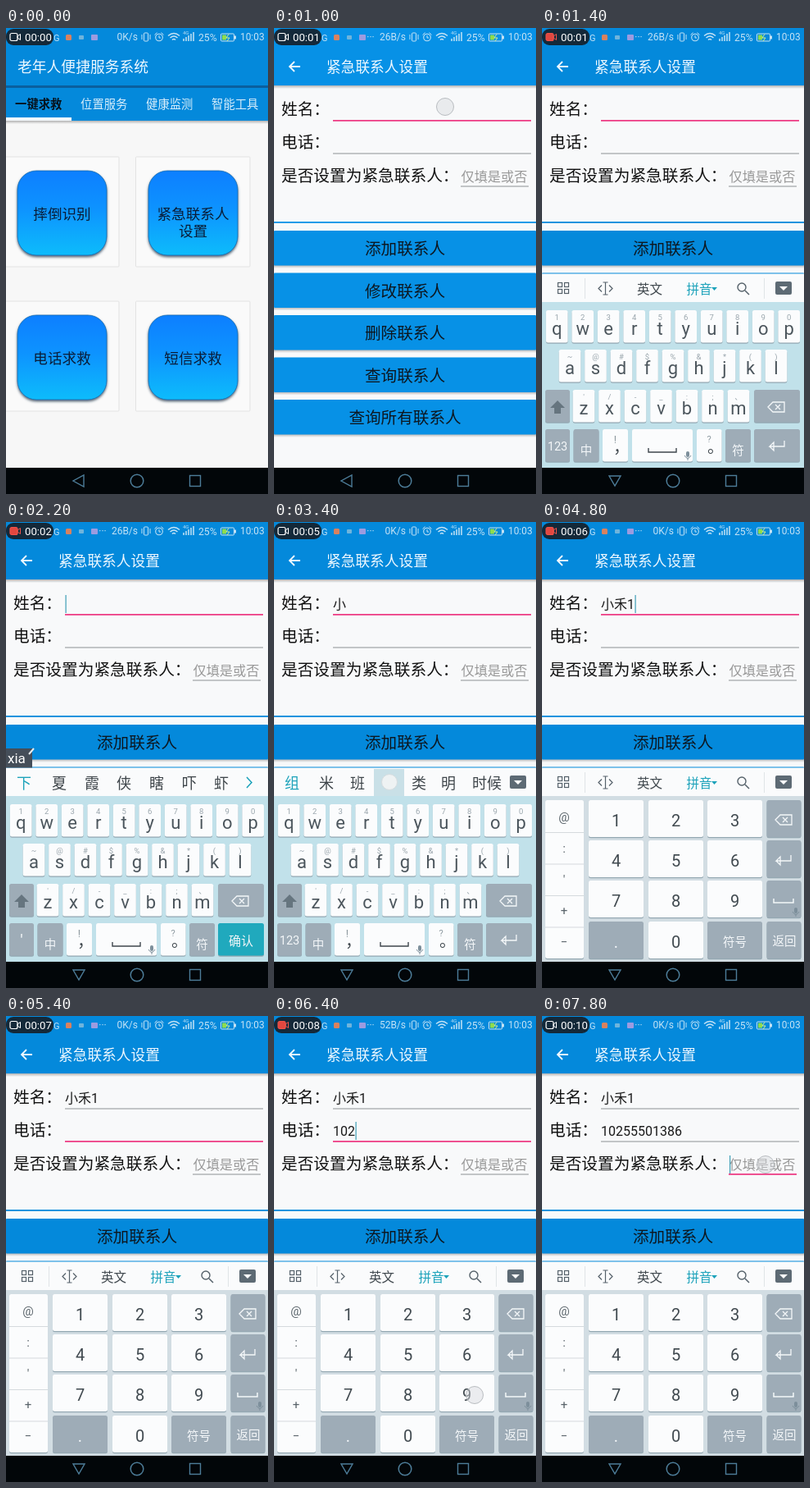
Recreate the animation shown at these times as an HTML page. Size 320 by 568 pixels, loop 8 s.

```html
<!DOCTYPE html>
<html lang="zh-CN">
<head>
<meta charset="utf-8">
<title>紧急联系人设置</title>
<style>
html, body { margin: 0; width: 100%; height: 100%; overflow: hidden; background: #000; }
svg { display: block; width: 320px; height: 568px; font-family: Roboto, "Noto Sans CJK SC", "Noto Sans CJK", sans-serif; }
</style>
</head>
<body>
<svg id="stage" viewBox="0 0 320 568" xmlns="http://www.w3.org/2000/svg"></svg>
<script>
const LOOP = 8000, STEP = 200;
const NAME = '小禾', PHONE = '10255501386';
const BLUE = '#0489db', PINK = '#ee3f86', TEAL = '#1ba2ba', GREY = '#9eacb7';
const stage = document.getElementById('stage');

const DEFS = `<defs>
<linearGradient id="tile" x2="0" y2="1"><stop stop-color="#087fff"/><stop offset=".45" stop-color="#0793ff"/><stop offset="1" stop-color="#0bbcfb"/></linearGradient>
<linearGradient id="fade" x2="0" y2="1"><stop stop-color="#000" stop-opacity=".28"/><stop offset="1" stop-color="#000" stop-opacity="0"/></linearGradient>
<filter id="soft" x="-20%" y="-20%" width="140%" height="150%"><feDropShadow dx="0" dy="2" stdDeviation="1.4" flood-color="#20384c" flood-opacity=".75"/></filter>
</defs>`;

const rect = (x, y, w, h, fill, rx = 0, more = '') =>
  `<rect x="${x}" y="${y}" width="${w}" height="${h}" fill="${fill}" rx="${rx}" ${more}/>`;
const path = (d, stroke, w = 1.2, fill = 'none') =>
  `<path d="${d}" stroke="${stroke}" stroke-width="${w}" fill="${fill}"/>`;
const ring = (x, y, r, stroke, w = 1.2, fill = 'none') =>
  `<circle cx="${x}" cy="${y}" r="${r}" stroke="${stroke}" stroke-width="${w}" fill="${fill}"/>`;
// y is the optical middle of the line
const text = (s, x, y, size, fill, anchor = 'start', more = '') =>
  `<text x="${x}" y="${(y + size * .37).toFixed(1)}" font-size="${size}" fill="${fill}" text-anchor="${anchor}" ${more}>${s}</text>`;
const mid = (s, x, y, size, fill, more) => text(s, x, y, size, fill, 'middle', more);
const touch = (x, y) => ring(x, y, 10.5, '#b9bdc1', 1, 'rgba(215,218,221,.45)');

// Last value whose start time has been reached: pick(t, start, value, start, value, ...)
function pick(t, ...pairs) {
  let v = pairs[1];
  for (let i = 0; i < pairs.length; i += 2) if (t >= pairs[i]) v = pairs[i + 1];
  return v;
}

function statusBar(t) {
  const ink = '#c4e2f5';
  const sec = pick(t, 0, 0, 800, 1, 1600, 2, 2400, 3, 2800, 4, 3200, 5, 4400, 6, 5200, 7, 6000, 8, 6800, 9, 7600, 10);
  const speed = pick(t, 0, '0K/s', 800, '26B/s', 2800, '0K/s', 5600, '52B/s', 7200, '0K/s');
  const phase = t % 866, red = phase > 300 && phase < 700;
  const rec = red ? '#f0524a' : '#fff';
  return text('G', 58, 11.5, 11, ink)
    + rect(73, 8, 7, 7, '#d9825f', 1.5) + rect(89, 9, 6, 5, '#6fb4dc', 1) + rect(104, 8, 8, 7, '#9c9be0', 1)
    + (t < 600 ? '' : text('···', 118, 11, 12, ink, 'middle'))
    + rect(0, 1, 58, 20, '#16222e', 9, 'opacity=".93"')
    + rect(5, 6.5, 9, 9, red ? '#e2473f' : 'none', 2, `stroke="${rec}" stroke-width="1.2"`)
    + path('M14 10l3.5-2.5v7L14 12z', rec, 1)
    + text('00:' + String(sec).padStart(2, '0'), 23, 11.5, 13.2, '#fff')
    + text(speed, 161, 11, 12, ink, 'end')
    + rect(168.5, 6, 5, 10, 'none', 1, `stroke="${ink}"`) + path('M166 8v6M176 8v6', ink, 1)
    + ring(187, 11.5, 4.3, ink, 1.1) + path('M187 9v3h2M181.5 8.5l3-3M192.5 8.5l-3-3', ink, 1)
    + path('M198 9.5q7-6 14 0M200.5 12q4.5-4 9 0M203 14.5q2-2 4 0', ink, 1.5)
    + text('4G', 216, 6, 6, ink)
    + path('M217 16v-3M220 16v-5M223 16v-7M226 16V7M229 16V5', ink, 1.5)
    + text('25%', 235, 11, 12.2, ink)
    + rect(262.5, 7, 16, 9, 'none', 1, `stroke="${ink}"`) + rect(264, 8.5, 5, 6, '#8edc4c') + rect(279, 9.5, 2, 4, ink)
    + path('M272 7.5l-3 4.5h4l-3 4', '#d5f28a', 1)
    + text('10:03', 286, 11, 11.9, ink);
}

function navBar(down) {
  const c = '#4d7d99';
  return rect(0, 536, 320, 32, '#020609')
    + path(down ? 'M82 546h14l-7 12z' : 'M95 545v14l-13-7z', c, 1.4)
    + ring(160, 552, 7.8, c, 1.5) + rect(224.5, 545.5, 13, 13, 'none', 0, `stroke="${c}" stroke-width="1.4"`);
}

function home() {
  const tile = (x, y, lines) => {
    const cardX = x < 100 ? -4 : 158.5, w = x < 100 ? 142 : 139.5;
    return rect(cardX, y - 17, w, 134, '#fafafa', 1, 'stroke="#e3e3e3"')
      + rect(x, y, 109, 103, 'url(#tile)', 23, 'filter="url(#soft)" stroke="#1769ad" stroke-width=".8"')
      + lines.map((s, i) => mid(s, x + 54.5, y + 52 + i * 21.5, 17.6, '#0a1d38', 'font-weight="500"')).join('');
  };
  const tabs = ['一键求救', '位置服务', '健康监测', '智能工具'];
  return rect(0, 0, 320, 568, '#f7f7f7')
    + rect(0, 0, 320, 113, BLUE) + rect(0, 70, 320, 3, '#0a5f9e')
    + rect(0, 113, 320, 4, 'url(#fade)')
    + text('老年人便捷服务系统', 14, 47, 17.8, '#eef8ff')
    + tabs.map((s, i) => mid(s, 39.7 + i * 80, 93, 14.3, i ? '#d9eefb' : '#06121c', i ? '' : 'font-weight="700"')).join('')
    + rect(0, 109, 80, 4, '#f4f9fc')
    + tile(14, 174, ['摔倒识别']) + tile(174, 174, ['紧急联系人', '设置'])
    + tile(14, 350, ['电话求救']) + tile(174, 350, ['短信求救']);
}

function form(t) {
  const focus = pick(t, 0, 0, 5200, 1, 7800, 2);
  const name = t < 2800 ? '' : t < 3600 ? '小' : t < 4600 ? NAME : NAME + '1';
  const typed = t < 5600 ? 0 : t < 6400 ? 1 + Math.floor((t - 5600) / 400) : 3 + Math.round((t - 6400) / 125);
  const phone = PHONE.slice(0, typed);
  const bar = t < 1200 ? '#0791e6' : BLUE;
  const line = (i, x1, x2, y) => rect(x1, y - (focus === i ? 1 : .5), x2 - x1, focus === i ? 1.8 : 1, focus === i ? PINK : '#8d9296');
  const solid = t >= 5600 && t < 7600;
  const blink = t >= 1200 && (solid || t % 1000 < 400 || t % 1000 >= 700);
  const caretX = [72.5 + name.length * 16 - (t >= 4600 ? 7 : 0), 72.5 + phone.length * 9, 229][focus];
  const caretY = [89, 129, 170][focus];
  const labels = ['添加联系人', '修改联系人', '删除联系人', '查询联系人', '查询所有联系人'];
  return rect(0, 0, 320, 568, '#f8f9fa')
    + rect(0, 0, 320, 70, bar) + rect(0, 70, 320, 4, 'url(#fade)')
    + path('M32 47H19.5M25 41l-6 6 6 6', '#eef8ff', 1.8)
    + text('紧急联系人设置', 64, 47, 17.7, '#eef8ff')
    + text('姓名：', 9, 99, 19.7, '#111') + text('电话：', 9, 139, 19.7, '#111')
    + text('是否设置为紧急联系人：', 9, 180, 19.7, '#111')
    + line(0, 72, 314, 113) + line(1, 72, 314, 153) + line(2, 228, 311, 193)
    + text(name, 72, 100, 16, '#191919') + text(phone, 72, 140, 16, '#191919')
    + text('仅填是或否', 228.5, 181, 16.2, '#999')
    + (blink ? rect(caretX, caretY, 1.2, 22, '#3f9fb6') : '')
    + rect(0, 236, 320, 1.8, bar)
    + labels.map((s, i) => {
      const y = 247 + i * 51.5;
      return rect(0, y + 42, 320, 4, 'url(#fade)') + rect(0, y, 320, 42.5, bar, 1) + mid(s, 160, y + 22, 19.6, '#0d1720');
    }).join('');
}

const key = (x, y, w, h, fill = '#fbfcfd') =>
  rect(x, y + 1.2, w, h, '#94a8b2', 2.5) + rect(x, y, w, h, fill, 2.5);

const collapse = x => rect(x - 10, 309, 20, 16, '#5d6a74', 2) + path(`M${x - 5} 315h10l-5 5z`, 'none', 0, '#fff');
const erase = (x, y) => path(`M${x - 10} ${y}l6-6h14v12h-14zM${x - 1} ${y - 3}l6 6m0-6l-6 6`, '#f4f7f9', 1.3);
const enter = (x, y) => path(`M${x + 9} ${y - 7}v7h-18l5-5v10l-5-5`, '#f4f7f9', 1.3);
const mic = (x, y) => rect(x - 2, y - 5, 4, 7, '#7d8f9b', 2) + path(`M${x - 4} ${y}q4 7 8 0M${x} ${y + 3}v3`, '#7d8f9b', 1);

function toolbar() {
  const c = '#55616a', boxes = [[20, 311], [28, 311], [20, 319], [28, 319]];
  return boxes.map(([x, y]) => rect(x - .5, y - .5, 5, 5, 'none', 0, `stroke="${c}" stroke-width="1.2"`)).join('')
    + path('M77.5 310v15M74.5 310h6M74.5 325h6M73 313.5l-4 4 4 4M82 313.5l4 4-4 4', c, 1.2)
    + mid('英文', 131.5, 318, 15.5, '#3f474d') + mid('拼音', 192, 318, 15.5, TEAL)
    + path('M207 316h7l-3.5 4z', 'none', 0, TEAL)
    + ring(244, 316, 5, c, 1.4) + path('M248 320l5 5', c, 1.5)
    + path('M52.5 305v25M271.5 305v25', '#e0e4e7', 1) + collapse(295);
}

function candidates(t) {
  const typing = t >= 1600 && t < 2800;
  const xs = typing ? [22, 65, 105, 144, 184, 224, 263] : [22, 64, 102, 141, 177, 213, 260];
  const words = t < 1800 ? '想 下 小 新 学 向 些' : t < 2000 ? '系 西 洗 喜 细 戏 席'
    : t < 2400 ? '下 夏 霞 侠 瞎 吓 虾' : t < 2800 ? '小 笑 校 效 消 晓 销'
    : t < 3600 ? `组 米 班 ${t < 3400 ? NAME[1] : ''} 类 明 时候` : '的 和 在 是 说 了 我们';
  return words.split(' ').map((s, i) => mid(s, xs[i], 318, 18, i ? '#3e454a' : TEAL)).join('')
    + (typing ? path('M294 311l6 6.5-6 6.5', TEAL, 1.5) : collapse(298))
    + (t === 3400 ? rect(122, 301, 37, 33, '#c9e0e7') + ring(141, 317, 9.5, '#d5dcdf', 1, '#eef2f3') : '');
}

function letters(t) {
  const typing = t >= 1600 && t < 2800;
  const rows = [
    ['qwertyuiop', '1234567890', 18.2, 344],
    ['asdfghjkl', '~@#$%&*()', 34, 392],
    ['zxcvbnm', "'/-_:;、", 51, 441]
  ];
  const cap = (c, sup, x, y) => key(x - 13.3, y, 26.6, 39.5)
    + mid(sup.replace('&', '&amp;'), x, y + 8, 9.5, '#9aa6ad') + mid(c, x, y + 22, 22, '#4c565d');
  const side = typing ? "'" : '123';
  return rect(0, 334, 320, 202, '#c1e1ea')
    + rows.map(([keys, sups, x, y]) => [...keys].map((c, i) => cap(c, sups[i], x + i * 31.5, y)).join('')).join('')
    + key(4, 441, 30, 39.5, GREY) + path('M19 454l9 9h-5v7h-8v-7h-5z', 'none', 0, '#66757f')
    + key(259, 441, 56, 39.5, GREY) + erase(286, 462)
    + key(4, 489, 30, 39.5, GREY) + mid(side, 19, 510, typing ? 20 : 14.5, '#f4f7f9')
    + key(38.5, 489, 31, 39.5, GREY) + mid('中', 54, 515, 14.5, '#f4f7f9')
    + key(74, 489, 31, 39.5) + mid('!', 89.5, 501, 13, '#8d999f') + text('，', 87, 511, 20, '#3f474d')
    + key(110, 489, 74, 39.5) + path('M130 512v5h34v-5', '#3f474d', 1.4) + mic(178, 521)
    + key(189, 489, 30.5, 39.5) + mid('?', 204, 501, 11, '#8d999f') + text('。', 202, 511, 20, '#3f474d')
    + key(224, 489, 31, 39.5, GREY) + mid('符', 239.5, 515, 14.5, '#f4f7f9')
    + key(259, 489, 56, 39.5, typing ? '#20a9bd' : GREY)
    + (typing ? mid('确认', 287, 510, 15, '#f4f7f9') : enter(287, 510));
}

const padX = [57, 130, 202], padY = [339, 388, 437, 487];

function numbers() {
  const pad = (i, fill) => key(padX[i % 3], padY[Math.floor(i / 3)], 67, 45, fill);
  const at = i => [padX[i % 3] + 33.5, padY[Math.floor(i / 3)] + 25];
  let s = rect(0, 334, 320, 202, '#d2dde3') + key(4, 339, 47, 193);
  ['@', ':', "'", '+', '−'].forEach((c, i) => {
    s += mid(c, 27, 359 + i * 38.2, 15, '#59636a');
    if (i) s += rect(4, 339.5 + i * 38.5, 47, 1, '#d5dadd');
  });
  for (let i = 0; i < 12; i++) {
    const label = i === 9 ? '.' : i === 10 ? '0' : i === 11 ? '符号' : i + 1;
    const dark = i === 9 || i === 11;
    s += pad(i, dark ? GREY : undefined) + mid(label, ...at(i), i === 11 ? 14.5 : 20, dark ? '#f4f7f9' : '#414a50');
  }
  padY.forEach(y => s += key(274.5, y, 42, 45, GREY));
  return s + erase(295, 363) + enter(295, 413)
    + path('M283 459v5h24v-5', '#f4f7f9', 1.5) + mic(310, 475)
    + mid('返回', 296, 511, 14.5, '#f4f7f9');
}

function keyboard(t) {
  const pinyin = pick(t, 0, '', 1600, 'x', 1800, 'xi', 2000, 'xia', 2400, 'xiao', 2800, '');
  const w = 5 + pinyin.length * 9;
  return rect(0, 299.5, 320, 35, '#fafbfc')
    + (t >= 4200 ? numbers() : letters(t))
    + (t < 1600 || t >= 4200 ? toolbar() : candidates(t))
    + (pinyin ? rect(0, 276, w, 23.5, '#454e59') + text(pinyin, 2, 288, 17, '#fff')
      + path(`M${w - 4} 283l6-7`, '#e8eef2', 2) : '');
}

function touches(t) {
  const digit = d => {
    const i = d === '0' ? 10 : d - 1;
    return touch(padX[i % 3] + 43, padY[Math.floor(i / 3)] + 24);
  };
  if (t === 400) return touch(232, 232);
  if (t === 1000) return touch(209, 96);
  if (t === 2600) return touch(22, 317);
  if (t === 4000) return touch(19, 510);
  if (t === 4600) return digit('1');
  if (t === 5200) return touch(209, 138);
  if (t === 5600 || t === 6000) return digit(PHONE[(t - 5600) / 400]);
  if (t === 6400) return touch(245, 462);
  if (t > 6400 && t <= 7400) return digit(PHONE[Math.min(10, 2 + Math.round((t - 6400) / 125))]);
  if (t === 7800) return touch(273, 181);
  return '';
}

function render(t) {
  const typing = t >= 1200;
  stage.innerHTML = DEFS + (t < 600 ? home() : form(t)) + statusBar(t)
    + (typing ? keyboard(t) : '') + navBar(typing) + touches(t);
}

let shown = -1;
function tick() {
  const t = Math.floor(performance.now() % LOOP / STEP) * STEP;
  if (t !== shown) render(shown = t);
  requestAnimationFrame(tick);
}
tick();
</script>
</body>
</html>
```
